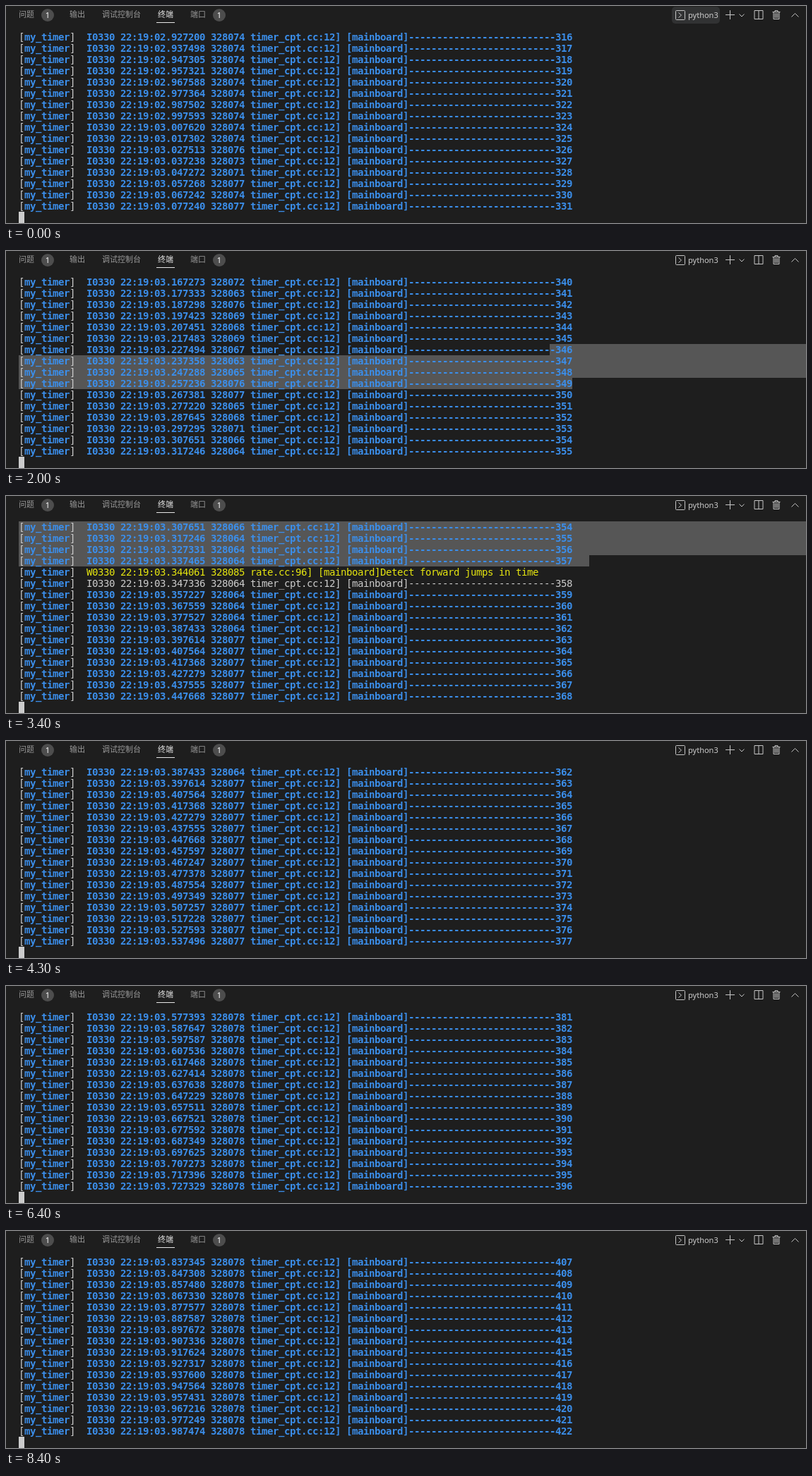
An HTML page for the animation above (8500 ms loop, 1133 by 308 pixels).

```html
<!DOCTYPE html>
<html lang="zh-CN">
<head>
<meta charset="utf-8">
<title>终端</title>
<style>
html, body { margin: 0; width: 100%; height: 100%; overflow: hidden; background: #1e1e1e; }
body { position: relative; }
header { font: 11px/16px "Noto Sans CJK SC", "Noto Sans CJK", sans-serif; color: #989898; }
header *, #log, #cursor { position: absolute; }
.tab { top: 3px; white-space: nowrap; }
.on { color: #e7e7e7; }
#line { left: 213px; top: 23px; width: 26px; height: 1px; background: #e7e7e7; }
.badge { top: 4px; width: 18px; height: 18px; border-radius: 9px; background: #4d4d4d; color: #fff;
  font: 11px/17px "Noto Sans", sans-serif; text-align: center; }
#hover { left: 943px; top: 1px; width: 68px; height: 24px; border-radius: 5px; background: #313233; }
#shell { left: 966px; top: 5px; color: #ccc; font: 11px/16px "Noto Sans", sans-serif; }
#icons { left: 0; top: 0; fill: none; stroke: #c5c5c5; }
#log { left: 0; top: 36px; width: 1133px; font: 14px/16px "DejaVu Sans Mono", monospace;
  letter-spacing: calc(8px - 1ch); color: #ccc; font-variant-ligatures: none; }
.row { position: relative; height: 16px; padding-left: 18px; white-space: pre; }
.row span { position: relative; z-index: 1; }
.row i { position: absolute; top: 0; height: 16px; background: #565656; }
.info { color: #3b8eea; font-weight: bold; }
.warn { color: #e5e510; }
#cursor { left: 18px; top: 292px; width: 8px; height: 16px; background: #ccc; }
</style>
</head>
<body>
<header>
  <span class="tab" style="left:18px">问题</span><b class="badge" style="left:50px">1</b>
  <span class="tab" style="left:90px">输出</span>
  <span class="tab" style="left:136px">调试控制台</span>
  <span class="tab on" style="left:215px">终端</span><div id="line"></div>
  <span class="tab" style="left:261px">端口</span><b class="badge" style="left:293px">1</b>
  <div id="hover"></div>
  <span id="shell">python3</span>
  <svg id="icons" width="1133" height="30">
    <rect x="948.5" y="6.5" width="13" height="13" rx="1"/>
    <path d="M952.5 9.5l4 3.5-4 3.5"/>
    <path d="M1025.5 6v13M1019 12.5h13"/>
    <path d="M1038.5 11.5l3.5 3.5 3.5-3.5"/>
    <path d="M1060 6.5h12v12h-12zM1066 6.5v12"/>
    <path d="M1085.5 8.5h11M1089 8v-1.5h4V8M1087 8.5v10h8v-10M1089 10v7M1091 10v7M1093 10v7"/>
    <path d="M1112.5 15.5l5-5 5 5"/>
  </svg>
</header>
<div id="log"></div>
<div id="cursor"></div>
<script>
const LOOP = 8500, STEP = 100, ROW = 16, COL = 8, LEFT = 18, RIGHT = 1133, ROWS = 16;
const FIRST = 316, LAST = 422, HOVER_END = 3;

// warnings printed just before these counts; the message after one is plain
const warnings = { 336: 3119160, 337: 3127137, 358: 3344061 };

// [tick, first visible row], and the ticks on which nothing scrolls
const scroll = [[0, 0], [7, 9], [14, 21], [20, 26], [50, 56], [64, 68], [84, 94]];
const held = [10, 12, 15, 17, 19, 51, 54, 59, 63, 68, 78];
const select = { from: 32, fromCol: 94, start: 20, last: [[20, 35], [27, 43]], col: [[20, 98], [27, 101]] };

const log = document.getElementById("log");
const hover = document.getElementById("hover");
const rows = [];

let seed = 7;
function random() {
  seed = seed * 48271 % 2147483647;
  return seed / 2147483647;
}

// messages come every 10 ms, a little off schedule
function messageTime(n) {
  return 2927500 + (n - FIRST) * 10000 + Math.round(random() * 500 - 300);
}

// worker threads are mixed at first, then one takes over at a time
function thread(n) {
  if (n < 326) return 328074;
  if (n < 355) return 328063 + Math.floor(random() * 15);
  return n < 363 ? 328064 : n < 378 ? 328077 : 328078;
}

function stamp(us) {
  const s = String(us);
  return "22:19:0" + s[0] + "." + s.slice(1);
}

function addRow(kind, text) {
  const row = document.createElement("div");
  row.className = "row";
  row.innerHTML = `<i></i><span>[<span class="info">my_timer</span>]  <span class="${kind}">${text}</span></span>`;
  log.append(row);
  rows.push(row);
}

for (let n = FIRST; n <= LAST; n++) {
  const warned = warnings[n];
  if (warned) addRow("warn", `W0330 ${stamp(warned)} 328085 rate.cc:96] [mainboard]Detect forward jumps in time`);
  addRow(warned ? "plain" : "info",
    `I0330 ${stamp(messageTime(n))} ${thread(n)} timer_cpt.cc:12] [mainboard]${"-".repeat(26)}${n}`);
}

function lerp(keys, t) {
  const end = keys[keys.length - 1];
  if (t >= end[0]) return end[1];
  const k = keys.findIndex(key => key[0] > t);
  const [t0, a] = keys[k - 1], [t1, b] = keys[k];
  return Math.round(a + (b - a) * (t - t0) / (t1 - t0));
}

function drawRows(tick) {
  const top = lerp(scroll, held.includes(tick) ? tick - 1 : tick);
  const on = tick >= select.start;
  const last = on ? lerp(select.last, tick) : -1;
  const endCol = on ? lerp(select.col, tick) : 0;
  log.style.transform = `translateY(${-top * ROW}px)`;
  rows.forEach((row, r) => {
    const x = LEFT + (r === select.from ? select.fromCol * COL : 0);
    const end = r === last ? LEFT + endCol * COL : RIGHT;
    const inside = r >= select.from && r <= last;
    const mark = row.firstChild;
    mark.style.left = x + "px";
    mark.style.width = (inside ? end - x : 0) + "px";
    row.style.visibility = r >= top && r < top + ROWS ? "visible" : "hidden";
  });
}

let shown = -1;
function draw() {
  const tick = Math.floor(performance.now() % LOOP / STEP);
  if (tick !== shown) {
    shown = tick;
    drawRows(tick);
    hover.style.visibility = tick < HOVER_END ? "visible" : "hidden";
  }
  requestAnimationFrame(draw);
}
draw();
</script>
</body>
</html>
```
